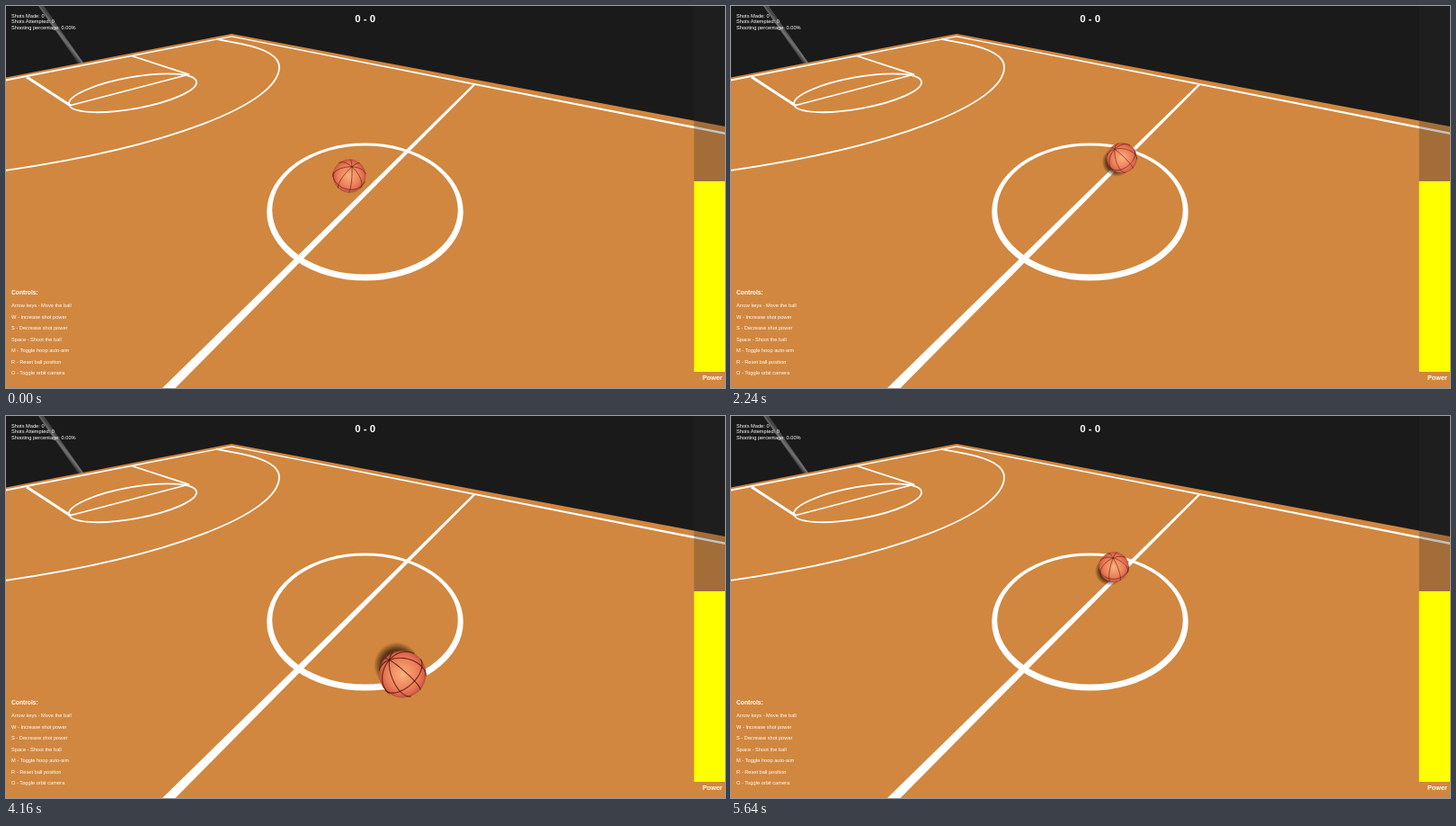
Recreate the animation shown at these times as an HTML page with a canvas. Size 800 by 425 pixels, loop 5680 ms.

```html
<!DOCTYPE html>
<html lang="en">
<head>
<meta charset="utf-8">
<title>Basketball court</title>
<style>
  html, body { margin: 0; width: 100%; height: 100%; overflow: hidden; background: #1a1a1a; }
  canvas, svg { position: absolute; left: 0; top: 0; width: 800px; height: 425px; display: block; }
  text { font-family: "Liberation Sans", Arial, sans-serif; font-size: 5.68px; fill: #fff; }
  .bold { font-weight: bold; }
</style>
</head>
<body>
<canvas id="stage" width="800" height="425"></canvas>
<svg viewBox="0 0 800 425">
  <g id="stats"></g>
  <text class="bold" x="399.7" y="17.8" text-anchor="middle" style="font-size:11.4px">0 - 0</text>
  <text class="bold" x="6" y="321.1" style="font-size:6.7px">Controls:</text>
  <g id="controls"></g>
  <text class="bold" x="775" y="416.2" style="font-size:7.3px">Power</text>
</svg>
<script>
const LOOP = 5680, STEP = 40, FRAMES = LOOP / STEP;
const TAU = 2 * Math.PI;
const ctx = document.getElementById('stage').getContext('2d');

function addLines(id, top, gap, lines) {
  document.getElementById(id).innerHTML = lines
    .map((s, i) => `<text x="6" y="${top + i * gap}">${s}</text>`).join('');
}
addLines('stats', 12.7, 6.7, ['Shots Made: 0', 'Shots Attempted: 0', 'Shooting percentage: 0.00%']);
addLines('controls', 335, 12.57, [
  'Arrow keys - Move the ball', 'W - Increase shot power', 'S - Decrease shot power',
  'Space - Shoot the ball', 'M - Toggle hoop auto-aim', 'R - Reset ball position',
  'O - Toggle orbit camera'
]);

// ---- Ball path: a widening orbit, eased in polar form through a few points ----
const hub = { x: 415, y: 215, squash: 0.74 };
const orbit = [
  [0, 382, 189], [880, 371, 225], [1640, 480, 228], [2880, 358, 194],
  [3640, 353, 266], [4720, 513, 232], [5640, 426, 168]
].map(([t, x, y]) => {
  const dx = x - hub.x, dy = (y - hub.y) / hub.squash;
  return { t, angle: Math.atan2(dy, dx), dist: Math.hypot(dx, dy) };
});
// The ball always circles the same way, so angles only fall.
orbit.forEach((p, i) => {
  while (i && p.angle > orbit[i - 1].angle) p.angle -= TAU;
});

function slope(i, key) {
  const a = orbit[Math.max(i - 1, 0)], b = orbit[Math.min(i + 1, orbit.length - 1)];
  return (b[key] - a[key]) / (b.t - a.t);
}

function ballAt(t) {
  let i = 0;
  while (i < orbit.length - 2 && t > orbit[i + 1].t) i++;
  const p = orbit[i], q = orbit[i + 1], d = q.t - p.t;
  const s = Math.min((t - p.t) / d, 1), s2 = s * s, s3 = s2 * s;
  const ease = k => p[k] + (3 * s2 - 2 * s3) * (q[k] - p[k])
    + d * ((s3 - 2 * s2 + s) * slope(i, k) + (s3 - s2) * slope(i + 1, k));
  const angle = ease('angle'), dist = ease('dist');
  const x = hub.x + dist * Math.cos(angle);
  const y = hub.y + dist * Math.sin(angle) * hub.squash;
  return { x, y, r: 16.7 + (y - 168) * 0.08 };
}

// ---- Rolling with quaternions [w, x, y, z]; z points to the viewer ----
function mul(a, b) {
  return [
    a[0] * b[0] - a[1] * b[1] - a[2] * b[2] - a[3] * b[3],
    a[0] * b[1] + a[1] * b[0] + a[2] * b[3] - a[3] * b[2],
    a[0] * b[2] - a[1] * b[3] + a[2] * b[0] + a[3] * b[1],
    a[0] * b[3] + a[1] * b[2] - a[2] * b[1] + a[3] * b[0]
  ];
}

function turn(x, y, z, angle) {
  const n = Math.hypot(x, y, z) || 1, s = Math.sin(angle / 2) / n;
  return [Math.cos(angle / 2), x * s, y * s, z * s];
}

function rotate(q, v) {
  return mul(mul(q, [0, ...v]), [q[0], -q[1], -q[2], -q[3]]).slice(1);
}

const spins = [turn(0.55, 0.16, 0, 0.61)];
for (let i = 1; i < FRAMES; i++) {
  const p = ballAt((i - 1) * STEP), q = ballAt(i * STEP);
  const dx = (q.x - p.x) / q.r, dy = (q.y - p.y) / q.r;
  const axis = [-1.45 * dy, 0.69 * dx, 0.72 * dx];
  spins.push(mul(turn(...axis, Math.hypot(...axis)), spins[i - 1]));
}

// ---- Drawing ----
function poly(color, ...pts) {
  ctx.fillStyle = color;
  ctx.beginPath();
  pts.forEach(([x, y]) => ctx.lineTo(x, y));
  ctx.fill();
}

function line(width, x1, y1, x2, y2) {
  ctx.lineWidth = width;
  ctx.beginPath();
  ctx.moveTo(x1, y1);
  ctx.lineTo(x2, y2);
  ctx.stroke();
}

function drawCourt() {
  ctx.fillStyle = '#1a1a1a';
  ctx.fillRect(0, 0, 800, 425);

  const metal = ctx.createLinearGradient(58, 34, 63, 30);
  metal.addColorStop(0, '#3c3c3c');
  metal.addColorStop(0.5, '#747474');
  metal.addColorStop(1, '#454545');
  ctx.strokeStyle = metal;
  line(5, 37, -3, 85, 66);

  // Floor, side line, base line and half-way line
  poly('#d1873f', [0, 79.5], [251, 31], [800, 134], [800, 425], [0, 425]);
  poly('#fff', [251, 33.2], [800, 140.5], [800, 143], [251, 34.4]);
  poly('#fff', [0, 81.4], [251, 33.2], [251, 34.4], [0, 83.4]);
  poly('#fff', [519.3, 87.5], [522, 88], [188.5, 425], [174, 425]);

  // Key and three-point line
  ctx.strokeStyle = '#fff';
  line(3, 23, 79, 72, 111);
  line(1.8, 140, 55.5, 204, 76.3);
  line(1.4, 71, 110.8, 204, 76);
  ctx.lineWidth = 1.8;
  ctx.beginPath();
  ctx.ellipse(141, 96.8, 72, 17.6, -0.176, 0, TAU);
  ctx.stroke();

  ctx.beginPath();
  ctx.moveTo(234, 36.8);
  ctx.lineTo(262, 42.2);
  ctx.bezierCurveTo(290, 48, 304, 56, 304, 68);
  ctx.bezierCurveTo(304, 109, 180, 157, 0, 182.8);
  ctx.stroke();

  // Centre circle, thicker toward the viewer
  ctx.fillStyle = '#fff';
  ctx.beginPath();
  ctx.ellipse(399.5, 229, 109.3, 76.6, 0, 0, TAU);
  ctx.closePath();
  ctx.moveTo(502.8, 227);
  ctx.ellipse(399.5, 227, 103.3, 71.6, 0, 0, TAU);
  ctx.fill('evenodd');
}

function disc(x, y, r, stops) {
  const g = ctx.createRadialGradient(x, y, 0, x, y, r);
  stops.forEach(([at, color]) => g.addColorStop(at, color));
  ctx.fillStyle = g;
  ctx.beginPath();
  ctx.arc(x, y, r, 0, TAU);
  ctx.fill();
}

function seam(ball, q, point) {
  let down = false;
  ctx.beginPath();
  for (let i = 0; i <= 72; i++) {
    const a = i * TAU / 72;
    const [x, y, z] = rotate(q, point(Math.cos(a), Math.sin(a)));
    if (z > 0) {
      const px = ball.x + x * ball.r, py = ball.y + y * ball.r;
      down ? ctx.lineTo(px, py) : ctx.moveTo(px, py);
    }
    down = z > 0;
  }
  ctx.stroke();
}

function drawBall(frame) {
  const ball = ballAt(frame * STEP), { x, y, r } = ball;
  disc(x - (x - 385) * 0.115, y - (y - 205) * 0.12, r * 0.98,
    [[0, 'rgba(45,24,6,.8)'], [0.68, 'rgba(45,24,6,.72)'], [1, 'rgba(45,24,6,0)']]);
  disc(x, y, r, [[0, '#f8b27c'], [0.3, '#f49a6c'], [0.68, '#ed7d58'], [0.9, '#d8644a'], [1, '#b64d38']]);

  // An equator and four full meridians
  const q = spins[frame];
  ctx.strokeStyle = 'rgba(72,22,12,.8)';
  ctx.lineWidth = r * 0.042;
  seam(ball, q, (c, s) => [c, s, 0]);
  for (let k = 0; k < 4; k++) {
    const u = Math.cos(k * TAU / 8), v = Math.sin(k * TAU / 8);
    seam(ball, q, (c, s) => [c * u, c * v, s]);
  }
}

function drawPower() {
  ctx.fillStyle = 'rgba(40,40,40,.28)';
  ctx.fillRect(765.6, 0, 34.4, 195);
  ctx.fillStyle = '#ff0';
  ctx.fillRect(765.6, 195, 34.4, 212);
}

const start = performance.now();
function tick() {
  const t = (performance.now() - start) % LOOP;
  drawCourt();
  drawBall(Math.floor(t / STEP));
  drawPower();
  requestAnimationFrame(tick);
}
tick();
</script>
</body>
</html>
```
